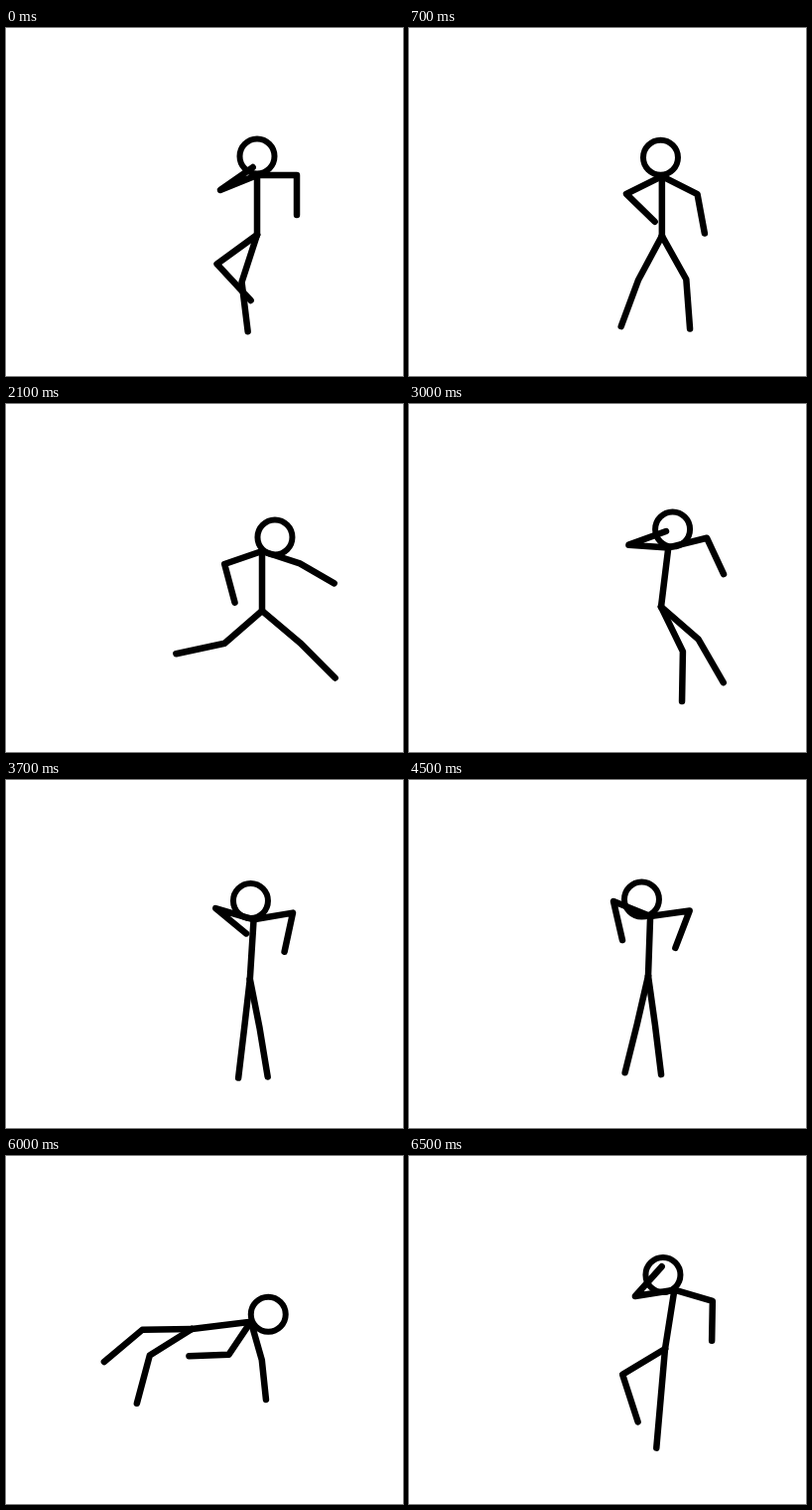
These frames come from a looping animation (400x350 px, 6600 ms). An HTML page with a canvas:

```html
<!DOCTYPE html>
<html lang="en">
<head>
<meta charset="utf-8">
<title>Stick figure</title>
<style>
  html, body { margin: 0; width: 100%; height: 100%; overflow: hidden; background: #fff; }
  canvas { display: block; }
</style>
</head>
<body>
<canvas id="stage" width="400" height="350"></canvas>
<script>
const ctx = document.getElementById('stage').getContext('2d');
const LOOP = 6600, STEP = 100;
const TORSO = 60, HEAD = 19, ARM = 40, LEG = 50;
const keys = [];

// Hip position, then the direction of each bone in degrees, clockwise from the right.
function pose(time, x, y, torso, head, armA, armB, legA, legB) {
  keys.push({ time, hip: [x, y], bones: [torso, head, ...armA, ...armB, ...legA, ...legB] });
}

// Step, turn and knee lift
pose(0,    253, 208,  -90,  -90, [0, 90],    [158, -35], [144, 47],    [108, 83]);
pose(400,  254, 210,  -90,  -92, [20, 70],   [155, 25],  [138, 125],   [95, 90]);
pose(1100, 256, 208,  -90,  -97, [36, 92],   [152, 70],  [92, 91],     [15, 80]);
pose(1400, 257, 209,  -90,  -99, [40, 100],  [152, 76],  [90, 90],     [-34, 97]);
// Leap and kick
pose(1800, 260, 194,  -90,  -70, [28, 55],   [157, 75],  [115, 135],   [10, 60]);
pose(2100, 258, 208,  -90,  -47, [18, 30],   [161, 75],  [139, 168],   [40, 45]);
pose(2800, 266, 198, -115,  -60, [10, 20],   [130, -20], [75, 115],    [5, 0]);
pose(3000, 254, 204,  -83,  -77, [-14, 65],  [184, -20], [64, 91],     [41, 60]);
pose(3500, 247, 201,  -86,  -95, [-10, 100], [195, 30],  [95, 95],     [78, 80]);
pose(4500, 241, 197,  -88, -117, [-8, 111],  [202, 77],  [103, 104],   [82, 83]);
// Crouch, dive and handspring
pose(4900, 238, 215, -110, -120, [130, 140], [145, 150], [120, 70],    [110, 70]);
pose(5200, 220, 160, -200, -205, [120, 120], [135, 130], [35, 60],     [-15, 50]);
pose(5400, 212, 139,   85,   74, [58, 78],   [111, 108], [-103, -26],  [-152, -60]);
pose(5800, 196, 150,   45,   45, [70, 80],   [100, 90],  [-125, -100], [180, 145]);
pose(6050, 185, 180,  -20,  -40, [75, 85],   [130, 200], [165, 110],   [140, 95]);
pose(6300, 240, 190,  -75, -110, [55, 95],   [235, 275], [145, 95],    [125, 80]);
pose(6500, 258, 194,  -81, -127, [16, 91],   [171, -48], [149, 72],    [95, 95]);
keys.push({ ...keys[0], time: LOOP });

const mix = (a, b, k) => a + (b - a) * k;
const turn = (a, b, k) => a + ((((b - a + 180) % 360) + 360) % 360 - 180) * k;

function move([x, y], angle, length) {
  const r = angle * Math.PI / 180;
  return [x + Math.cos(r) * length, y + Math.sin(r) * length];
}

function limb(start, upper, lower, length) {
  const joint = move(start, upper, length);
  ctx.beginPath();
  ctx.moveTo(...start);
  ctx.lineTo(...joint);
  ctx.lineTo(...move(joint, lower, length));
  ctx.stroke();
}

function draw(time) {
  const i = keys.findIndex(key => key.time > time);
  const from = keys[i - 1], to = keys[i];
  const k = (time - from.time) / (to.time - from.time);
  const hip = from.hip.map((v, n) => mix(v, to.hip[n], k));
  const b = from.bones.map((v, n) => turn(v, to.bones[n], k));
  const neck = move(hip, b[0], TORSO);

  ctx.fillStyle = '#fff';
  ctx.fillRect(0, 0, 400, 350);
  ctx.strokeStyle = '#000';
  ctx.lineCap = ctx.lineJoin = 'round';

  ctx.lineWidth = 6.5;
  ctx.beginPath();
  ctx.moveTo(...hip);
  ctx.lineTo(...neck);
  ctx.stroke();
  limb(neck, b[2], b[3], ARM);
  limb(neck, b[4], b[5], ARM);
  limb(hip, b[6], b[7], LEG);
  limb(hip, b[8], b[9], LEG);

  ctx.lineWidth = 6;
  ctx.beginPath();
  ctx.arc(...move(neck, b[1], HEAD), 17.5, 0, Math.PI * 2);
  ctx.stroke();
}

const start = performance.now();
function tick() {
  const time = (performance.now() - start) % LOOP;
  draw(Math.floor(time / STEP) * STEP);
  requestAnimationFrame(tick);
}
tick();
</script>
</body>
</html>
```
